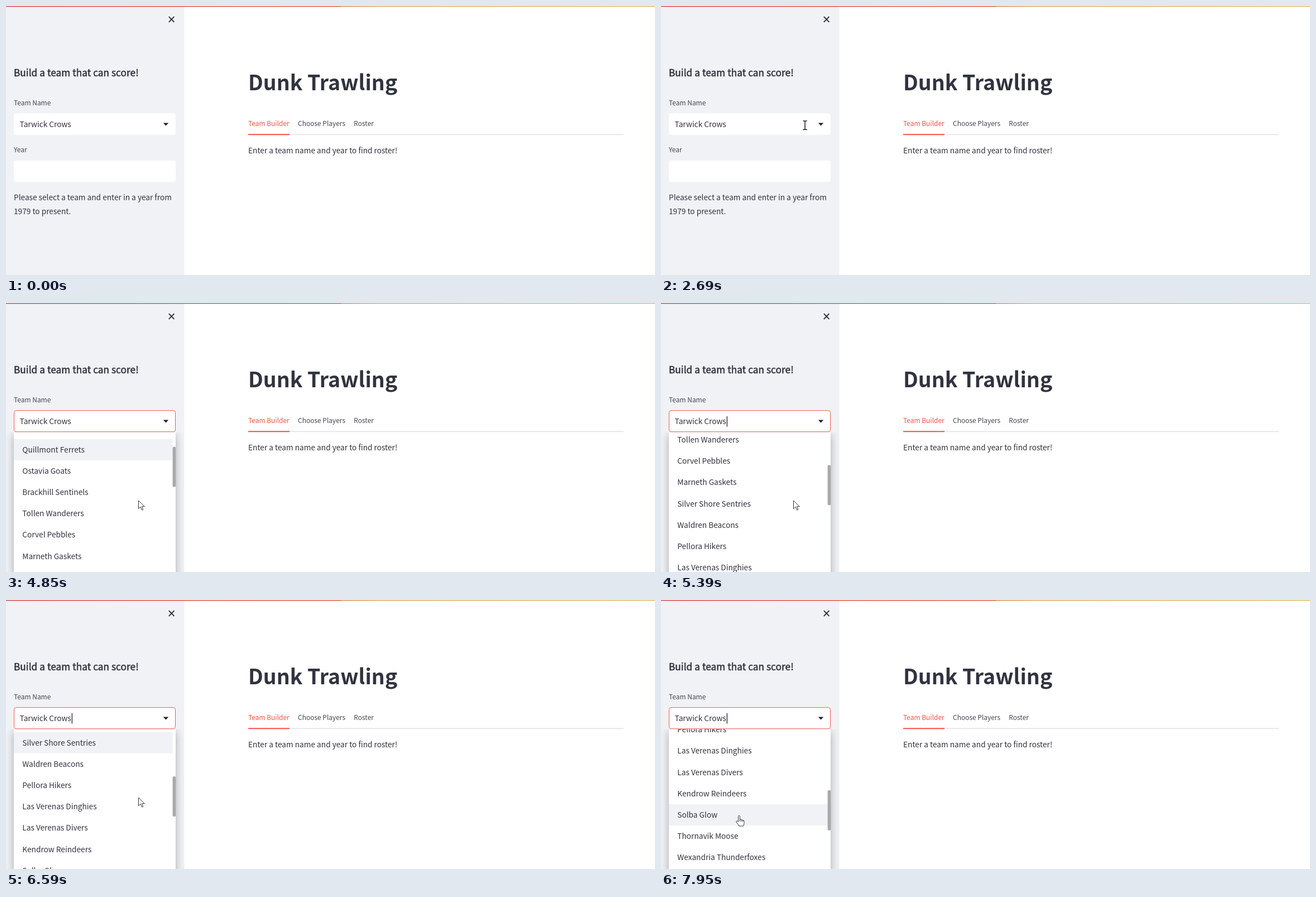
An HTML page that plays this animation: 1163x482 px, repeating every 8 s.

```html
<!DOCTYPE html>
<html lang="en">
<head>
<meta charset="utf-8">
<title>Team picker</title>
<style>
  html, body { margin: 0; width: 100%; height: 100%; overflow: hidden; background: #fff; }
  svg { display: block; width: 1163px; height: 482px; }
  text {
    font: 13.68px "Noto Sans CJK JP", "Noto Sans CJK SC", "Noto Sans CJK", "Noto Sans", sans-serif;
    fill: #31333f; white-space: pre;
  }
  .small { font-size: 11.97px; fill: #43454f; }
  .title { font-size: 37.6px; font-weight: 700; }
  .heading { font-size: 17.1px; letter-spacing: .11px; stroke: #31333f; stroke-width: .55px; }
  .red { fill: #fb4e42; }
  .menu-box { fill: #fff; filter: drop-shadow(0 4px 8px rgba(0, 0, 0, .3)); }
  .pointer { fill: #fff; stroke: #333; stroke-width: 1; stroke-linejoin: round; }
</style>
</head>
<body>
<svg viewBox="0 0 1163 482">
  <defs>
    <linearGradient id="bar">
      <stop offset="0" stop-color="#dc4a3e"/>
      <stop offset=".516" stop-color="#de5a43"/>
      <stop offset=".516" stop-color="#df8a4e"/>
      <stop offset=".575" stop-color="#dfaa59"/>
      <stop offset="1" stop-color="#e3bb60"/>
    </linearGradient>
    <clipPath id="below"><rect y="231.6" width="320" height="251"/></clipPath>
  </defs>

  <rect width="1163" height="482" fill="#fff"/>
  <rect width="319.6" height="482" fill="#f0f2f6"/>
  <rect width="1163" height="1.4" fill="url(#bar)"/>
  <path d="M291.8 19.2l9.6 9.6m0-9.6l-9.6 9.6" stroke="#20222b" stroke-width="1.7"/>

  <text class="heading" x="14" y="126.3">Build a team that can score!</text>
  <text class="small" x="14" y="177.6">Team Name</text>
  <rect x="14" y="192.3" width="290" height="38.8" rx="4" fill="#fff"/>
  <rect id="focus" x="14.5" y="192.7" width="289" height="38" rx="3.6" fill="none" stroke="#f9574f"/>
  <text id="value" x="24.6" y="217"></text>
  <path d="M281.8 209.6h9.4l-4.7 4.8z" fill="#20222b"/>
  <rect id="caret" y="203" width="1.2" height="18.5" fill="#111"/>
  <text class="small" x="14" y="262.3">Year</text>
  <rect x="14" y="277" width="290" height="38.3" rx="4" fill="#fff"/>
  <text x="14" y="347.5">Please select a team and enter in a year from</text>
  <text x="14" y="372.5">1979 to present.</text>

  <text class="title" x="434" y="150.5">Dunk Trawling</text>
  <text class="small red" x="434" y="214.7">Team Builder</text>
  <text class="small" x="523" y="214.7">Choose Players</text>
  <text class="small" x="623.3" y="214.7">Roster</text>
  <rect x="434" y="229.3" width="672.6" height="1.9" fill="#e6e7ea"/>
  <rect class="red" x="434" y="229.3" width="74" height="1.9"/>
  <text x="434" y="263.5">Enter a team name and year to find roster!</text>

  <g id="menu" clip-path="url(#below)">
    <rect class="menu-box" x="14" y="231.6" width="290" height="286"/>
    <g id="list"><rect id="hover" x="14" width="284.5" height="38.2" fill="#f0f2f6"/></g>
    <rect id="thumb" x="298.6" width="5.6" height="72" rx="2.6" fill="#a9a9ab"/>
  </g>

  <g id="cursor">
    <path id="arrow" class="pointer" d="M.5.5V15.2L4 11.9l2.6 5.7 2.2-1-2.5-5.4h4.9z"/>
    <path id="beam" fill="none" stroke="#111" stroke-width="1.4"
      d="M-3.8-7.8h2.6Q0-7.8 0-6.8Q0-7.8 1.2-7.8H3.8M0-6.8V6.8M-3.8 7.8h2.6Q0 7.8 0 6.8Q0 7.8 1.2 7.8H3.8"/>
    <path id="hand" class="pointer" d="M-1.5 11V1.5Q-1.5.5-.1.5T1.4 1.5V7.2Q4 6.6 4.2 8Q6.5 7.4 6.7 8.8Q9 8.4 9 10.4V13.5Q9 15.5 7.5 19H-.3Q-1 16.5-3.2 14.5L-5.2 11.6Q-5.6 10.2-4.2 9.8Q-3 9.8-1.5 11.6M1.4 7.2V11M4.2 8v3.2M6.7 8.8v2.6"/>
  </g>
</svg>
<script>
const LOOP = 8000, UPDATE = 68, ROW = 38.2, TOP = 231.8;
const APPEAR = 390, CLICK = 3165, BLINK_FROM = 3240, BLINK = 530, THUMB_FROM = 3840;

const teams = [
  "Tarwick Crows", "Hollen Gannets", "Fernwick Oars", "Quillmont Ferrets",
  "Ostavia Goats", "Brackhill Sentinels", "Tollen Wanderers", "Corvel Pebbles",
  "Marneth Gaskets", "Silver Shore Sentries", "Waldren Beacons", "Pellora Hikers",
  "Las Verenas Dinghies", "Las Verenas Divers", "Kendrow Reindeers", "Solba Glow",
  "Thornavik Moose", "Wexandria Thunderfoxes"
];

const smooth = p => p * p * (3 - 2 * p);
const slowing = p => 1 - (1 - p) ** 2;
const mix = (a, b, p) => a + (b - a) * p;
const rowAt = ({ y, scroll }) => Math.max(0, Math.floor((y - TOP + scroll) / ROW));

// Each action starts from the state the previous one left
const actions = [];
let state = { x: 902, y: 461, scroll: 0 }, row = 0, rest = 0;

function act(start, end, change, ease) {
  // The hovered row only refreshes after a real pause
  if (start - rest > 250) row = rowAt(state);
  const to = { ...state, ...change };
  actions.push({ start, end, from: state, to, ease, row, wheel: "scroll" in change });
  state = to;
  rest = end;
}
const move = (start, end, x, y) => act(start, end, { x, y }, smooth);
const wheel = (start, end, scroll) => act(start, end, { scroll }, slowing);

move(APPEAR, 460, 878, 461);
move(660, 790, 336.5, 276);
move(990, 1467, 242.2, 225);
move(1535, 2070, 207.5, 216.5);
move(2270, 3030, 288.5, 212);
move(3100, 3440, 284.3, 231.5);
move(3776, 4370, 237, 353.5);
wheel(4650, 5390, 235.2);
wheel(5710, 6187, 273.4);
wheel(6255, 6660, 345);
wheel(6860, 7200, 438.9);
move(7268, 7610, 154, 377.5);
move(7680, 7950, 140, 386);

// The screen refreshes in even steps while an action runs
function progress({ start, end }, t) {
  const count = Math.round((end - start) / UPDATE) + 1;
  const gap = (end - start) / (count - 1);
  return Math.min(1, (Math.floor((t - start) / gap) + 1) / count);
}

function pointerKind({ x, y }, scrolling) {
  if (x > 304 || y < 192 || scrolling) return "arrow";
  if (y < TOP) return "beam";
  return actions[0] && menuOpen ? "hand" : "arrow";
}

const $ = id => document.getElementById(id);
const set = (id, attrs) => {
  for (const name in attrs) $(id).setAttribute(name, attrs[name]);
};
const show = (id, on) => { $(id).style.display = on ? "" : "none"; };
let menuOpen = false;

teams.forEach((name, i) => {
  const label = document.createElementNS("http://www.w3.org/2000/svg", "text");
  label.textContent = name;
  label.setAttribute("x", 29.3);
  label.setAttribute("y", TOP + ROW * i + 24.2);
  $("list").append(label);
});
$("value").textContent = teams[0];
set("caret", { x: 25.6 + $("value").getComputedTextLength() });

function draw(t) {
  const action = actions.findLast(a => a.start <= t) || actions[0];
  const { from, to, ease, wheel } = action;
  const p = ease(progress(action, t));
  const now = {};
  for (const key in from) now[key] = mix(from[key], to[key], p);

  menuOpen = t >= CLICK;
  show("focus", menuOpen);
  show("caret", t >= BLINK_FROM && Math.floor((t - BLINK_FROM) / BLINK) % 2 === 0);
  set("menu", { opacity: Math.min(1, Math.max(0, (t - CLICK) / 180)) });
  set("list", { transform: `translate(0 ${-now.scroll})` });
  set("hover", { y: TOP + ROW * (wheel ? action.row : rowAt(now)) });
  set("thumb", { y: 232 + now.scroll * .248 });
  show("thumb", t >= THUMB_FROM);

  const kind = t < APPEAR ? "" : pointerKind(now, wheel);
  set("cursor", { transform: `translate(${now.x} ${now.y})` });
  for (const id of ["arrow", "beam", "hand"]) show(id, id === kind);
}

function tick() {
  draw(performance.now() % LOOP);
  requestAnimationFrame(tick);
}
tick();
</script>
</body>
</html>
```
